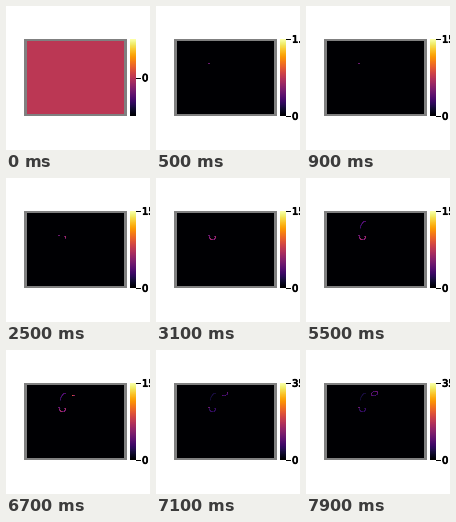
Animation, 144 px wide and 144 px high, one loop 8 s. Source, as a matplotlib script:

```python
import numpy as np
import matplotlib.pyplot as plt
from matplotlib.animation import FuncAnimation
from matplotlib.patches import Rectangle
from matplotlib.patheffects import withStroke

SIZE, DPI = 144, 72
STEP = 100                        # ms per frame
LEFT, RIGHT, TOP, BOTTOM = 21, 118, 35, 108
BAR_TOP, BAR_BOTTOM = 33, 110
INFERNO = plt.get_cmap("inferno")

# The top of the colour scale from each start time (ms) on
SCALES = {500: 1.0, 700: 14, 900: 15, 6900: 25, 7100: 35}

fig = plt.figure(figsize=(SIZE / DPI, SIZE / DPI), dpi=DPI, facecolor="white")
ax = fig.add_axes([0, 0, 1, 1])
ax.set_axis_off()


def box(x0, y0, x1, y1, color):
    return ax.add_patch(Rectangle((x0, y0), x1 - x0, y1 - y0, facecolor=color,
                                  linewidth=0, antialiased=False))


def make_tick(y):
    mark = box(130, round(y), 135, round(y) + 1, "black")
    label = ax.text(136, y + 3.65, "0", family="DejaVu Sans", size=10,
                    va="baseline",
                    path_effects=[withStroke(linewidth=0.8, foreground="black")])
    return mark, label


def arc(start, end, center, radii, angle, sweep, tilt, peak, seed):
    """Visits along part of an ellipse: time, column, row and count."""
    n = 40
    u = np.linspace(0, 1, n)
    a = np.radians(angle + sweep * u)
    t = np.radians(tilt)
    dx, dy = radii[0] * np.cos(a), radii[1] * np.sin(a)
    x = center[0] + dx * np.cos(t) - dy * np.sin(t)
    y = center[1] + dx * np.sin(t) + dy * np.cos(t)
    # The walker moves one stretch every 200 ms
    times = start + np.floor(u * ((end - start) / 200 + 0.99)) * 200
    cols = np.rint(x).astype(int) - LEFT
    rows = np.rint(y).astype(int) - TOP
    noise = np.random.default_rng(seed).uniform(0.1, 1, n)
    return times, cols, rows, peak * noise


ARCS = [
    arc(2500, 3100, (56, 59), (2.8, 2), -30, 240, 0, 7, 1),
    arc(4300, 5500, (59, 50), (5, 7), 180, 90, 0, 4, 2),
    arc(6700, 7900, (68, 43), (3.4, 2), 150, -350, -20, 11, 3),
]
times, cols, rows, counts = (np.concatenate(part) for part in zip(*ARCS))

box(18, BAR_TOP, 121, BAR_BOTTOM, "#808080")
ramp = np.linspace(1, 0, BAR_BOTTOM - BAR_TOP)[:, None]
ax.imshow(ramp, cmap=INFERNO, extent=(124, 130, BAR_BOTTOM, BAR_TOP),
          aspect="auto", interpolation="nearest", zorder=2)
field = ax.imshow(np.zeros((BOTTOM - TOP, RIGHT - LEFT)), cmap=INFERNO,
                  vmin=0, vmax=1, extent=(LEFT, RIGHT, BOTTOM, TOP),
                  aspect="auto", interpolation="nearest", zorder=2)
bottom, middle, top = (make_tick(y) for y in (110, 71.6, 33))
ax.set_xlim(0, SIZE)
ax.set_ylim(SIZE, 0)


def show(tick, visible):
    for artist in tick:
        artist.set_visible(visible)


def heat(ms, limit):
    grid = np.zeros((BOTTOM - TOP, RIGHT - LEFT))
    grid[57 - TOP, 52 - LEFT:54 - LEFT] = 0.3    # resting place
    seen = times <= ms
    np.maximum.at(grid, (rows[seen], cols[seen]), counts[seen] / limit)
    return grid


def update(frame):
    ms = frame * STEP
    limits = [limit for start, limit in SCALES.items() if start <= ms]
    show(bottom, bool(limits))
    show(top, bool(limits))
    show(middle, not limits)
    if limits:
        field.set_data(heat(ms, limits[-1]))
        top[1].set_text(str(limits[-1]))
    else:
        field.set_data(np.full((BOTTOM - TOP, RIGHT - LEFT), 0.5))
    return [field]


anim = FuncAnimation(fig, update, frames=80, interval=STEP, repeat=True,
                     repeat_delay=0, blit=False)
plt.show()
```
